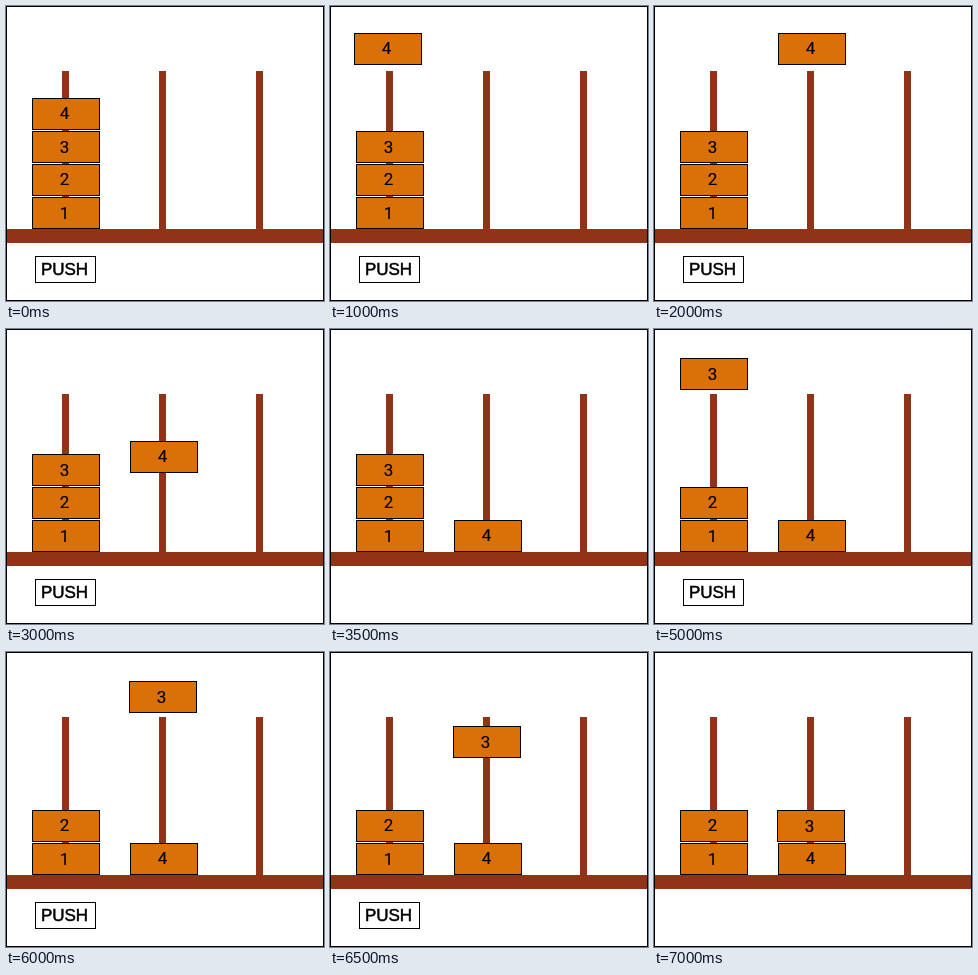
Animation of 318x295 px, one loop 8000 ms. Source, as an HTML page:

```html
<!DOCTYPE html>
<html lang="en">
<head>
<meta charset="utf-8">
<title>Stack push</title>
<style>
  html, body { margin: 0; width: 100%; height: 100%; overflow: hidden; background: #fff; }
  svg { display: block; width: 318px; height: 295px; }
  text { text-anchor: middle; stroke: #000; }
  .wood { fill: #903316; }
  .block rect { fill: #da7008; stroke: #000; }
  .block text { font: 17px Roboto, sans-serif; stroke-width: .15; }
  .push text { font: 17px "Liberation Sans", Arial, sans-serif; stroke-width: .5; }
  .frame { fill: none; stroke: #000; }
</style>
</head>
<body>
<svg viewBox="0 0 318 295"></svg>
<script>
const LOOP = 8000, HOP = 500, TURN = 3500, REST = 1000;
const HOME = 26, FLOOR = 191, PITCH = 33;
const svg = document.querySelector("svg");

// One key point per hop: lift, slide across, drop onto the second peg.
const routes = {
  4: [{ x: 24, y: 27 }, { x: 70 }, { x: 124 }, { y: 75 }, { y: 112 }, { y: FLOOR }],
  3: [{ y: 76 }, { y: 29 }, { x: 74 }, { x: 123 }, { y: 74 }, { y: FLOOR - PITCH }]
};

function add(parent, tag, attrs, text = "") {
  const el = document.createElementNS("http://www.w3.org/2000/svg", tag);
  for (const key in attrs) el.setAttribute(key, attrs[key]);
  el.textContent = text;
  return parent.appendChild(el);
}

function box(parent, cls, x, y, width, height) {
  return add(parent, "rect", { class: cls, x, y, width, height });
}

function makeBlock(label) {
  const el = add(svg, "g", { class: "block" });
  box(el, "", 0.5, 0.5, 67, 31);
  add(el, "text", { x: 32.5, y: 21 + label % 2 }, label);
  return { el, label, route: routes[label] || [] };
}

for (let peg = 0; peg < 3; peg++) box(svg, "wood", 56 + 97 * peg, 65, 7, 158);
box(svg, "wood", 0, 223, 318, 14);
const blocks = [1, 2, 3, 4].map(makeBlock);
const push = add(svg, "g", { class: "push" });
box(push, "frame", 29.5, 250.5, 60, 26);
add(push, "text", { x: 58.5, y: 269 }, "PUSH");
box(svg, "frame", 0.5, 0.5, 317, 294);

function place({ label, route }, t) {
  const start = REST + TURN * (4 - label);
  const hops = Math.max(0, Math.floor((t - start) / HOP) + 1);
  const home = { x: HOME, y: FLOOR - PITCH * (label - 1) };
  return Object.assign(home, ...route.slice(0, hops));
}

function draw(t) {
  for (const block of blocks) {
    const { x, y } = place(block, t);
    block.el.setAttribute("transform", `translate(${x} ${y})`);
  }
  // The button is gone while a freshly landed block rests.
  const landed = t >= TURN && t % TURN < REST;
  push.setAttribute("visibility", landed ? "hidden" : "visible");
}

const begin = performance.now();
function tick(now) {
  draw(Math.max(0, now - begin) % LOOP);
  requestAnimationFrame(tick);
}
draw(0);
requestAnimationFrame(tick);
</script>
</body>
</html>
```
